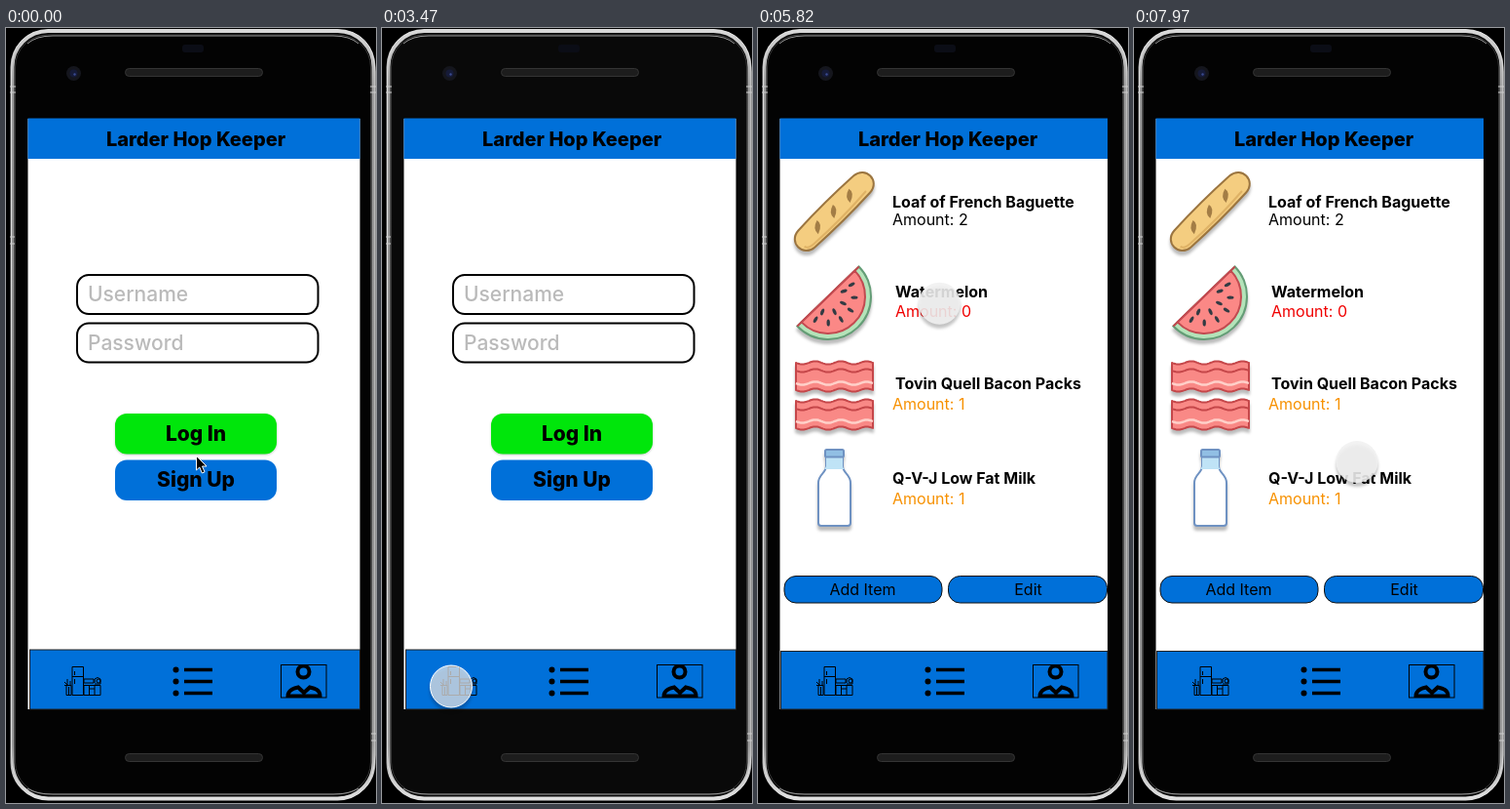
Animation of 380 by 794 pixels, one loop 8 s. Source, as an HTML page:

```html
<!DOCTYPE html>
<html lang="en">
<head>
<meta charset="utf-8">
<title>Grocery app prototype</title>
<style>
  html, body { margin: 0; width: 100%; height: 100%; overflow: hidden; background: #000; }
  svg { display: block; width: 100%; height: 100%; font: 16px Inter, sans-serif; }
  .blue { fill: #0070d9; }
  .bold { font-weight: 800; }
  .mid { text-anchor: middle; }
  .hint { fill: #bababa; font-size: 21px; font-weight: 500; }
  .name { font-weight: 650; }
  .line { fill: none; stroke: #000; }
  .drop { filter: drop-shadow(0 4px 1.5px #0004); }
  .soft { filter: drop-shadow(0 1px 1px #0003); }
</style>
</head>
<body>
<svg viewBox="0 0 380 794">
  <defs>
    <linearGradient id="metal" x2="0" y2="1">
      <stop offset="0" stop-color="#d8d8d8"/>
      <stop offset=".08" stop-color="#9a9a9a"/>
      <stop offset=".5" stop-color="#8a8a8a"/>
      <stop offset=".93" stop-color="#9a9a9a"/>
      <stop offset="1" stop-color="#e2e2e2"/>
    </linearGradient>
    <clipPath id="badge"><rect x="282" y="653" width="48" height="33"/></clipPath>
    <g id="bacon" stroke-linejoin="round" fill="none"></g>
    <g id="icons">
      <g class="line">
        <path d="M68 654.500H79.500V683.500H68ZM68 664.500H79.500M70.500 659V663M70.500 667V672M80 667H90V671H80ZM80 673.500H97V683.500H80ZM85.500 674V683M91 674V683M86 677H91M60 673.500H67V683.500H62V674M64.500 675V683M60 670L63 673M63 667V673M66 669V673M91 671V667Q94 664 97 667V672H91"/>
        <circle cx="95" cy="669" r="2"/>
        <rect x="282.500" y="652.500" width="46.500" height="33.500"/>
        <g stroke-width="4" clip-path="url(#badge)">
          <circle cx="305.500" cy="659.500" r="6"/>
          <path d="M289.500 684.500C289.500 678 297 676 300 675.500L306 681L312 675.500C317 676.500 322.500 678 322.500 684.500Z"/>
        </g>
        <path d="M183 657.500H212M183 669.500H212M183 681.500H212" stroke-width="3.500"/>
      </g>
      <circle cx="174.500" cy="657.500" r="3"/>
      <circle cx="174.500" cy="669.500" r="3"/>
      <circle cx="174.500" cy="681.500" r="3"/>
    </g>
  </defs>

  <!-- phone -->
  <rect id="body" x="6.500" y="3" width="371" height="786.500" rx="37" stroke="url(#metal)" stroke-width="4"/>
  <rect x="9.500" y="7" width="365" height="778" rx="33" fill="none" stroke="#333"/>
  <path d="M5.500 745V45Q6 3 45 2H340Q378 3 379 45V745Q378 789 340 790.500H45Q6 789 5.500 745" fill="none" stroke="#dedede"/>
  <path d="M22 16Q31 8 48 8H336Q353 8 362 16M22 779Q31 785 48 785H336Q353 785 362 779" fill="none" stroke="#999"/>
  <path d="M4 60H10M4 66H10M4 214H9M4 221H9M374 60H380M374 66H380M375 723H380M375 730H380" stroke="#ccc"/>
  <g fill="#1d1d1d" stroke="#343434">
    <rect x="122.500" y="41.500" width="141" height="8" rx="4"/>
    <rect x="122.500" y="743.500" width="141" height="8" rx="4"/>
  </g>
  <rect x="181" y="17" width="22" height="8" rx="3" fill="#0b0d16"/>
  <circle cx="69.500" cy="46.500" r="7.500" fill="#15161d"/>
  <circle cx="69.500" cy="46.500" r="4" fill="#161b38"/>
  <circle cx="70.500" cy="47.500" r="1.200" fill="#3a4a90"/>

  <g id="login">
    <rect x="22.500" y="93" width="341" height="605" fill="#fff"/>
    <rect class="blue" x="22.500" y="92.500" width="341" height="41.500"/>
    <rect class="blue" x="24.500" y="637" width="339" height="61" stroke="#222"/>
    <g class="line" stroke-width="2">
      <rect x="73" y="253" width="247.500" height="40" rx="12"/>
      <rect x="73" y="302.500" width="247.500" height="40" rx="12"/>
    </g>
    <text class="hint" x="84" y="280">Username</text>
    <text class="hint" x="84" y="330">Password</text>
    <rect class="soft" x="112" y="395" width="166" height="41.500" rx="12" fill="#00e60b"/>
    <rect class="blue" x="112" y="442.500" width="166" height="41.500" rx="12"/>
    <g class="bold mid" font-size="21">
      <text x="195" y="423">Log In</text>
      <text x="195" y="470">Sign Up</text>
    </g>
  </g>

  <g id="pantry">
    <rect x="22.500" y="93" width="336.500" height="605" fill="#fff"/>
    <rect class="blue" x="22.500" y="92.500" width="336.500" height="41.500"/>
    <rect class="blue" x="23.500" y="638.500" width="335.500" height="59.500" stroke="#222"/>

    <g class="drop"><g transform="translate(78.300 188) rotate(-44.600)">
      <path d="M-40 -12Q0 -14 40 -12C56 -11 56 11 40 12Q0 14 -40 12C-56 11 -56 -11 -40 -12Z" fill="#f4cd80" stroke="#9b7540" stroke-width="2"/>
      <path d="M-47 4Q-46 9 -36 9Q0 11 38 8" fill="none" stroke="#dfb265" stroke-width="2"/>
      <path id="cut" d="M-5 5Q-6 -3 4 -6Q6 1 -5 5Z" fill="#a37d45"/>
      <use href="#cut" x="-23"/><use href="#cut" x="23"/>
    </g></g>

    <g class="drop"><g transform="translate(72 275) rotate(-44)" stroke-width="2">
      <path d="M-44 0A44 44 0 0 0 44 0Z" fill="#b4e3b9" stroke="#649d76"/>
      <path d="M-38 0A38 38 0 0 0 38 0Z" fill="#fb8886" stroke="#c24a50"/>
      <path d="M-44 0H44" stroke="#c24a50"/>
      <g id="seeds" fill="#333b43"></g>
    </g></g>

    <g class="drop"><use href="#bacon"/><use href="#bacon" y="39"/></g>

    <g class="drop" stroke="#6f92c2" stroke-width="2" stroke-linejoin="round">
      <path d="M70 440V449C70 456 62 457 62 466V507Q62 510 65 510H92Q95 510 95 507V466C95 457 87 456 87 449V440Z" fill="#fff"/>
      <path d="M70 440V449Q69 451 68 452H89Q87 451 87 449V440Z" fill="#bfe3f6" stroke="none"/>
      <rect x="69" y="432" width="19" height="7.500" rx="1.500" fill="#91bfe4"/>
    </g>

    <g id="rows"></g>
    <g class="blue" stroke="#111">
      <rect x="27" y="561.500" width="162" height="27.500" rx="12"/>
      <rect x="195.500" y="561.500" width="163" height="27.500" rx="12"/>
    </g>
    <text class="mid" x="107.500" y="580.500">Add Item</text>
    <text class="mid" x="277.500" y="580.500">Edit</text>
  </g>

  <text class="bold mid" x="195" y="121" font-size="20">Larder Hop Keeper</text>
  <use href="#icons"/>

  <path id="arrow" d="M.500 .500V15L3.800 12L6.300 18L9 16.800L6.500 11H11Z" fill="#000" stroke="#fff"/>
  <g id="touch"><circle r="21.500" class="drop"/></g>
</svg>
<script>
const $ = id => document.getElementById(id);

// name, x, baseline, amount, x, baseline, colour
const items = [
  ['Loaf of French Baguette', 138, 183.5, 2, 138, 201.5, '#000'],
  ['Watermelon', 141, 275.5, 0, 141, 296, '#f00000'],
  ['Tovin Quell Bacon Packs', 141, 370, 1, 138, 390.5, '#f79100'],
  ['Q-V-J Low Fat Milk', 138, 467, 1, 138, 487.5, '#f79100'],
];
$('rows').innerHTML = items.map(([name, x, y, n, ax, ay, color]) =>
  `<text class="name" x="${x}" y="${y}">${name}</text>
   <text x="${ax}" y="${ay}" fill="${color}">Amount: ${n}</text>`).join('');

const wave = (y, back) => {
  const pts = [];
  for (let x = 39; x <= 118; x++) pts.push(`${x} ${(y + 1.6 * Math.sin((x - 39) / 4.2)).toFixed(1)}`);
  return (back ? pts.reverse() : pts).join('L');
};
$('bacon').innerHTML =
  `<path d="M${wave(343)}L${wave(371, true)}Z" fill="#f98986" stroke="#c5474a" stroke-width="2"/>
   <path d="M${wave(351)}" stroke="#c5474a" stroke-width="2"/>
   <path d="M${wave(364)}" stroke="#ffd0c9" stroke-width="2.5"/>`;

let seeds = '';
for (const [r, n] of [[27, 6], [17, 4]])
  for (let i = 0; i < n; i++) {
    const a = 180 * (i + .6) / (n + .2);
    seeds += `<ellipse cx="${r}" rx="3.6" ry="1.7" transform="rotate(${a})"/>`;
  }
$('seeds').innerHTML = seeds;

// time, x, y
const arrowPath = [
  [50, 195, 438], [290, 173, 352], [500, 173, 352], [700, 175, 373], [920, 170, 322],
  [1140, 161, 351], [1350, 161, 351], [1400, 160, 350],
];
const touchPath = [
  [2620, 161, 359], [3410, 71, 674.5], [4100, 71, 674.5], [4340, 93, 601], [4520, 116, 480],
  [4700, 82, 345], [4880, 64, 264], [5100, 209, 221], [5350, 285, 208], [5700, 178, 270],
  [6100, 230, 305], [6520, 136, 371], [6550, 136, 371], [6670, 154, 371], [7030, 291, 375],
  [7200, 291, 375], [7600, 200, 430], [7970, 229, 444.5],
];

// Cubic path that comes to rest wherever a position is held.
function slope(keys, i, k) {
  const a = keys[i - 1], b = keys[i], c = keys[i + 1];
  const same = (p, q) => p[1] === q[1] && p[2] === q[2];
  return !a || !c || same(a, b) || same(b, c) ? 0 : (c[k] - a[k]) / (c[0] - a[0]);
}
function along(keys, t) {
  if (t <= keys[0][0]) return keys[0].slice(1);
  const i = keys.findIndex(key => key[0] > t) - 1;
  if (i < 0) return keys[keys.length - 1].slice(1);
  const a = keys[i], b = keys[i + 1], d = b[0] - a[0], u = (t - a[0]) / d;
  const s = u * u * (3 - 2 * u);
  return [1, 2].map(k => a[k] + (b[k] - a[k]) * s
    + d * u * (1 - u) * ((1 - u) * slope(keys, i, k) - u * slope(keys, i + 1, k)));
}

const show = (id, on) => $(id).setAttribute('display', on ? 'inline' : 'none');
const place = (id, keys, t) => $(id).setAttribute('transform', `translate(${along(keys, t)})`);
const dot = $('touch').firstElementChild;

function draw(now) {
  const t = now % 8000, pressed = t >= 3470 && t < 3830;
  show('login', t < 3830);
  show('pantry', t >= 3830);
  show('arrow', t < 2470);
  show('touch', t >= 2470);
  place('arrow', arrowPath, t);
  place('touch', touchPath, t);
  dot.setAttribute('fill', pressed ? '#eeeeeeb8' : '#f1f1f1e0');
  dot.setAttribute('stroke', pressed ? '#fff' : 'none');
  $('body').setAttribute('fill', t >= 2470 && t < 5400 ? '#090909' : '#030303');
  requestAnimationFrame(draw);
}
draw(performance.now());
</script>
</body>
</html>
```
